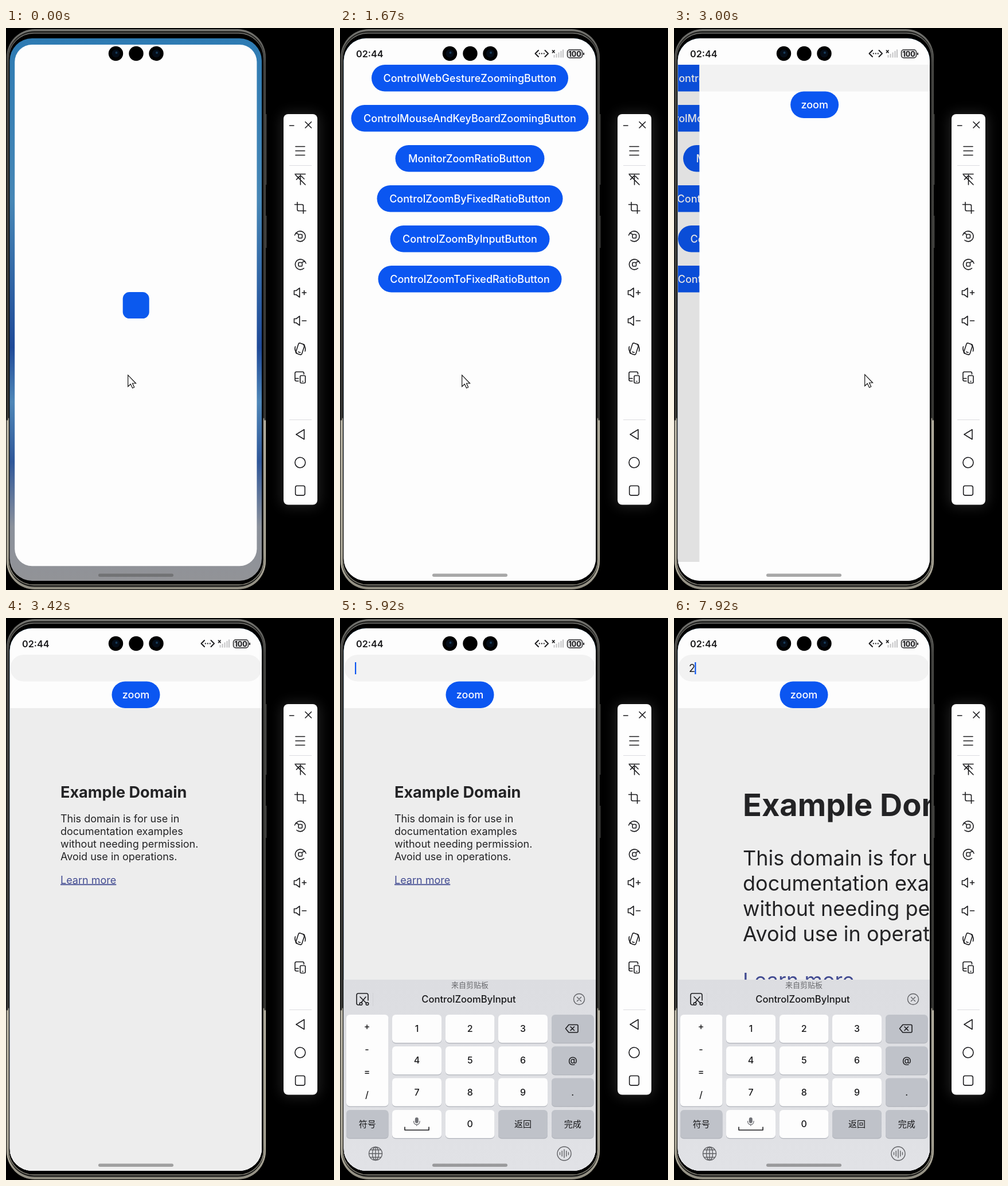
Recreate the animation shown at these times as an HTML page. Size 572 px wide and 979 px high, loop 8000 ms.

```html
<!DOCTYPE html>
<html lang="en">
<head>
<meta charset="utf-8">
<title>Zoom by input</title>
<style>
  html, body { margin: 0; height: 100%; overflow: hidden; background: #000; }
  svg { display: block; width: 100vw; height: 100vh; font-family: Inter, 'Noto Sans CJK SC', 'Noto Sans CJK', sans-serif; }
  .line { fill: none; stroke: #1c1c1f; stroke-width: 1.6; stroke-linecap: round; stroke-linejoin: round; }
  .mid { text-anchor: middle; }
  .button rect { fill: #0b56f1; }
  .button text { fill: #fff; font-size: 18px; font-weight: 500; }
  #keys text { font-size: 16px; font-weight: 500; fill: #19191b; }
  #keys .word { font-size: 15px; }
  #article { font-size: 18px; fill: #232325; }
</style>
</head>
<body>
<svg viewBox="0 0 572 979">
  <defs>
    <clipPath id="screenClip"><rect x="6.5" y="18" width="439.5" height="945" rx="39"/></clipPath>
    <clipPath id="pageClip"><rect x="7" y="64" width="439" height="866"/></clipPath>
    <clipPath id="revealClip"><rect id="reveal" y="64" width="440" height="899"/></clipPath>
    <clipPath id="webClip"><rect x="7" y="157" width="439" height="806"/></clipPath>
    <linearGradient id="wallpaper" x2="0" y2="1">
      <stop offset="0" stop-color="#2e7bb3"/><stop offset=".3" stop-color="#4787b6"/>
      <stop offset=".57" stop-color="#1f4a98"/><stop offset=".67" stop-color="#4f87b8"/>
      <stop offset=".78" stop-color="#2f5799"/><stop offset=".9" stop-color="#8b919b"/>
      <stop offset="1" stop-color="#929397"/>
    </linearGradient>
    <linearGradient id="metal" x2="0" y2="1">
      <stop offset="0" stop-color="#777773"/><stop offset=".06" stop-color="#4a4a47"/>
      <stop offset=".697" stop-color="#3a3a37"/><stop offset=".699" stop-color="#c9c4b3"/>
      <stop offset=".94" stop-color="#bab5a4"/><stop offset="1" stop-color="#8e8b7f"/>
    </linearGradient>
    <linearGradient id="board" x2="0" y2="1">
      <stop offset="0" stop-color="#dcdde1"/><stop offset="1" stop-color="#e1e2e6"/>
    </linearGradient>
    <filter id="glow" x="-1" y="-.1" width="3" height="1.2"><feGaussianBlur stdDeviation="11"/></filter>
  </defs>

  <!-- phone body -->
  <path d="M453.5 150V273M453.5 327V383" stroke="#3b3b39" stroke-width="2"/>
  <rect x="1" y="2" width="452" height="976" rx="49" fill="url(#metal)"/>
  <rect x="3.5" y="5.5" width="447" height="968" rx="46" fill="#1d1d1b"/>
  <rect x="4.5" y="9" width="445" height="961" rx="44" fill="#000" stroke="url(#metal)" stroke-width="1.3"/>

  <g clip-path="url(#screenClip)">
    <rect x="6" y="18" width="441" height="945" fill="url(#wallpaper)"/>
    <rect id="window" fill="#fdfdfd"/>
    <rect id="icon" fill="#0b59ee"/>
    <g id="list" clip-path="url(#pageClip)"><g id="listBody"></g><rect id="dim" x="7" y="64" width="439" height="866"/></g>
    <g id="zoomPage" clip-path="url(#revealClip)"><g id="zoomBody">
      <rect x="7" y="64" width="440" height="899" fill="#fdfdfd"/>
      <rect x="7.5" y="64" width="438" height="46.5" rx="23" fill="#f2f2f2"/>
      <text id="typed" x="26" y="94" font-size="18" fill="#19191b">2</text>
      <rect id="caret" y="77" width="2.2" height="21" fill="#0b56f1"/>
      <g class="button"><rect id="zoomButton" x="184.5" y="110.5" width="84" height="46.5" rx="23.2"/><text class="mid" x="226.5" y="140">zoom</text></g>
      <g id="web" clip-path="url(#webClip)">
        <rect x="7" y="157" width="440" height="806" fill="#ededed"/>
        <g id="article">
          <text font-size="27.1" font-weight="700">Example Domain</text>
          <text y="43">This domain is for use in</text>
          <text y="65">documentation examples</text>
          <text y="87">without needing permission.</text>
          <text y="109">Avoid use in operations.</text>
          <text y="149.5" fill="#434c92" text-decoration="underline">Learn more</text>
        </g>
      </g>
    </g></g>
    <g id="keyboard">
      <rect x="6" y="630" width="441" height="340" fill="url(#board)"/>
      <text class="mid" x="226.5" y="644" font-size="13" fill="#68696d">来自剪贴板</text>
      <text class="mid" x="224.5" y="670" font-size="16.6" font-weight="500" fill="#19191b">ControlZoomByInput</text>
      <path d="M57.5 653V676" stroke="#d0d1d5"/>
      <g class="line">
        <path d="M34 674H32q-3 0-3-3V657q0-3 3-3H46q3 0 3 3V666M35 660 46 671M45 660 37 670"/>
        <circle cx="36.5" cy="672" r="2.3"/><circle cx="47.5" cy="672" r="2.3"/>
      </g>
      <g class="line" style="stroke:#606165;stroke-width:1.4">
        <circle cx="417" cy="664" r="9.5"/><path d="m413.5 660.5 7 7m0-7-7 7"/>
        <circle cx="62" cy="933" r="11.5"/><ellipse cx="62" cy="933" rx="5.5" ry="11.5"/>
        <path d="M62 921.5V944.5M50.5 933H73.5M53 926.5H71M53 939.5H71"/>
        <circle cx="391" cy="933" r="12"/>
        <path d="M383.5 931V935M387.2 928.5V937.5M391 926V940M394.8 928.5V937.5M398.5 931V935"/>
      </g>
      <g id="keys"></g>
      <g class="line">
        <path d="M399 708.5H413q2 0 2 2V720q0 2-2 2H399l-5.5-6.7ZM402 712l6.5 6.5m0-6.5-6.5 6.5"/>
        <path d="M113 887V892H155V887"/>
      </g>
      <rect x="130.8" y="870" width="6" height="10" rx="3" fill="#707176"/>
      <path d="M128.5 876q0 6.5 5.3 6.5t5.3-6.5M133.8 882.5V885" fill="none" stroke="#707176" stroke-width="1.3"/>
    </g>
    <g id="status">
      <text x="28" y="50.5" font-size="16.2" font-weight="600" fill="#19191b">02:44</text>
      <path class="line" d="m346 39-5.5 5.5L346 50M357.5 39l5.5 5.5-5.5 5.5" style="stroke-width:2"/>
      <path d="M346.8 44.5h2m2 0h2m2 0h2" stroke="#1c1c1f" stroke-width="2"/>
      <path d="m370 38.5 4.5 5m0-5-4.5 5" stroke="#1c1c1f" stroke-width="1.7"/>
      <path d="M373.5 47V51.5M377.5 45V51.5M381.5 42.5V51.5M385.5 40V51.5M389 37.5V51.5" stroke="#c2c2c4" stroke-width="2"/>
      <rect x="396.5" y="38" width="26" height="14" rx="4" fill="#e4e4e5" stroke="#29292b" stroke-width="1.5"/>
      <path d="M425 43V47" stroke="#29292b" stroke-width="2"/>
      <text class="mid" x="409.5" y="49.5" font-size="12.5" font-weight="700" fill="#19191b">100</text>
    </g>
    <rect x="161" y="950.5" width="131" height="5.5" rx="2.75" fill="#555" opacity=".5"/>
    <g id="cameras"></g>
  </g>

  <!-- emulator toolbar -->
  <rect x="480" y="148" width="67" height="686" rx="12" fill="#fff" opacity=".13" filter="url(#glow)"/>
  <rect x="484" y="150" width="59" height="680.5" rx="8" fill="#fefefe"/>
  <path d="M494 239.5H533M494 682.5H533" stroke="#dcdce0"/>
  <g class="line">
    <path d="M494.5 170H502M522 163.5l10.5 10.5m0-10.5L522 174"/>
    <path d="M505 206.5H521M505 214H521M505 221.5H521"/>
    <path d="M504 254.5H522M505 256 522 273M513.5 256V273M513.5 257l-7 7M515 258l5 5"/>
    <path d="M503.5 307.5H516q2.5 0 2.5 2.5V323M508 303.5V316q0 2.5 2.5 2.5H523"/>
    <g id="turn"><path d="M505.5 358A9 9 0 1 1 507 369.5M503.5 361l2-4 4 2"/><rect x="510" y="359.5" width="6.5" height="6.5" rx="1.5"/></g>
    <use href="#turn" transform="matrix(-1 0 0 1 1026.5 49)"/>
    <g id="speaker"><path d="M502.5 457.5H506l6-4.5V469l-6-4.5H502.5Z"/><path d="M516.5 461H523.5"/></g>
    <path d="M520 457.5V464.5"/>
    <use href="#speaker" y="49"/>
    <g transform="rotate(18 513 559)"><rect x="507.5" y="549.5" width="11" height="19" rx="2.5"/><path d="M511.5 565H515"/></g>
    <path d="M504.5 555q-2 6 3 12M521.5 563q2-6-3-12"/>
    <path d="M510 615H506.5q-2.5 0-2.5-2.5V601.5q0-2.5 2.5-2.5H517q2.5 0 2.5 2.5V603M504 610.5H510"/>
    <rect x="513" y="605.5" width="9" height="13" rx="2"/><path d="M517 615.5H518"/>
    <path d="M506 708 520 699.5V716.5Z"/>
    <circle cx="513" cy="757" r="9"/>
    <rect x="504.7" y="797.5" width="16.6" height="16.6" rx="3"/>
  </g>
  <path id="cursor" d="M.7.7V20.5L5.3 16.2 8.6 23.2 11.7 21.7 8.5 15H14.5Z" fill="#fff" stroke="#111" stroke-width="1.2"/>
</svg>
<script>
const LOOP = 8000;
const el = id => document.getElementById(id);
const set = (id, attrs) => { for (const k in attrs) el(id).setAttribute(k, attrs[k]); };
const show = (id, on) => set(id, { opacity: Number(on) });
const progress = (t, from, to) => Math.min(1, Math.max(0, (t - from) / (to - from)));
const lerp = (a, b, p) => a + (b - a) * p;
const easeOut = p => 1 - (1 - p) ** 3;
const smooth = p => p * p * (3 - 2 * p);

const buttons = [
  ['ControlWebGestureZoomingButton', 343], ['ControlMouseAndKeyBoardZoomingButton', 414],
  ['MonitorZoomRatioButton', 260], ['ControlZoomByFixedRatioButton', 324],
  ['ControlZoomByInputButton', 278], ['ControlZoomToFixedRatioButton', 320]
];
el('listBody').innerHTML = '<rect x="-90" y="64" width="640" height="866" fill="#fdfdfd"/>' +
  buttons.map(([label, w], i) => `<g class="button" id="button${i}">
    <rect x="${226.5 - w / 2}" y="${64 + i * 70}" width="${w}" height="46.5" rx="23.2"/>
    <text class="mid" x="226.5" y="${93.5 + i * 70}">${label}</text></g>`).join('');

const columns = [[11, 73.5], [91, 86], [184, 85.5], [276, 86], [369, 73.5]];
const rows = [691, 746.3, 801.5, 857];
function key(label, column, row, gray, h = 49) {
  const [x, w] = columns[column], y = rows[row];
  const box = (dy, fill) => `<rect x="${x}" y="${y + dy}" width="${w}" height="${h}" rx="6" fill="${fill}"/>`;
  const kind = String(label).length > 1 ? 'mid word' : 'mid';
  return box(1.2, '#b0b3ba') + box(0, gray ? '#bfc2c9' : '#fdfdfd') +
    `<text class="${kind}" x="${x + w / 2}" y="${y + 30}">${label}</text>`;
}
let keys = key('', 0, 0, false, 159.5);
[...'+-=/'].forEach((c, i) => keys += `<text class="mid" x="47" y="${717 + i * 39.7}">${c}</text>`);
for (let n = 0; n < 9; n++) keys += key(n + 1, n % 3 + 1, Math.floor(n / 3));
['', '@', '.', '完成'].forEach((c, row) => keys += key(c, 4, row, true));
keys += key('符号', 0, 3, true) + key('', 1, 3) + key('0', 2, 3) + key('返回', 3, 3, true);
el('keys').innerHTML = keys;

el('cameras').innerHTML = [191.5, 227, 262].map((x, i) => `<circle cx="${x}" cy="44.5" r="12.7"/>` +
  (i === 1 ? '' : `<circle cx="${x}" cy="44.5" r="7" fill="#050d18"/><circle cx="${x + 1}" cy="43" r="2" fill="#173a58"/>`)).join('');

// time, x, y of the pointer tip
const pointer = [[0, 212, 604], [1780, 212, 604], [2150, 300, 366], [2380, 300, 366], [2700, 332, 603], [3100, 332, 603]];

function drawLaunch(t) {
  const p = easeOut(progress(t, 0, 300));
  const w = lerp(422, 441, p), h = lerp(908, 946, p), size = lerp(46, 48, p);
  const cy = lerp(483, 490.5, p);
  set('window', { x: 226.3 - w / 2, y: cy - h / 2, width: w, height: h, rx: lerp(30, 37, p) });
  set('icon', { x: 226.7 - size / 2, y: cy - size / 2, width: size, height: size, rx: size / 4 });
  show('icon', t < 1050);
  show('status', progress(t, 300, 420));
  show('list', progress(t, 900, 1050));
}

function drawPush(t) {
  const s = Math.max(0, t - 2600) / 98;
  const p = t > 3350 ? 1 : 1 - (1 + s) * Math.exp(-s);
  set('listBody', { transform: `translate(${-88 * p})` });
  show('dim', 0.12 * p);
  set('reveal', { x: lerp(446, 7, p) });
  set('zoomBody', { transform: `translate(${219 * (1 - p)})` });
  show('zoomPage', p > 0);
  show('web', t >= 3250);
}

function drawInput(t) {
  const up = easeOut(progress(t, 5550, 5900));
  set('keyboard', { transform: `translate(0 ${340 * (1 - up)})` });
  const typed = t >= 6800, zoomed = t >= 7500;
  show('typed', typed);
  set('caret', { x: typed ? 36.2 : 26 });
  show('caret', t >= 5500 && (t - 5500) % 1000 < 500);
  set('article', { transform: zoomed ? 'translate(120 345) scale(2)' : 'translate(95 313)' });
}

function drawPointer(t) {
  const i = pointer.findLastIndex(k => k[0] <= t);
  const a = pointer[i], b = pointer[i + 1] || a;
  const p = a === b ? 0 : smooth(progress(t, a[0], b[0]));
  set('cursor', { transform: `translate(${lerp(a[1], b[1], p)} ${lerp(a[2], b[2], p)})` });
  show('cursor', t < 3100);
  const press = (node, from, to) => node.style.fill = t >= from && t < to ? '#094fdb' : '';
  press(el('button4').firstElementChild, 2230, 2370);
  press(el('zoomButton'), 7380, 7500);
}

function frame() {
  const t = performance.now() % LOOP;
  drawLaunch(t);
  drawPush(t);
  drawInput(t);
  drawPointer(t);
  requestAnimationFrame(frame);
}
frame();
</script>
</body>
</html>
```
